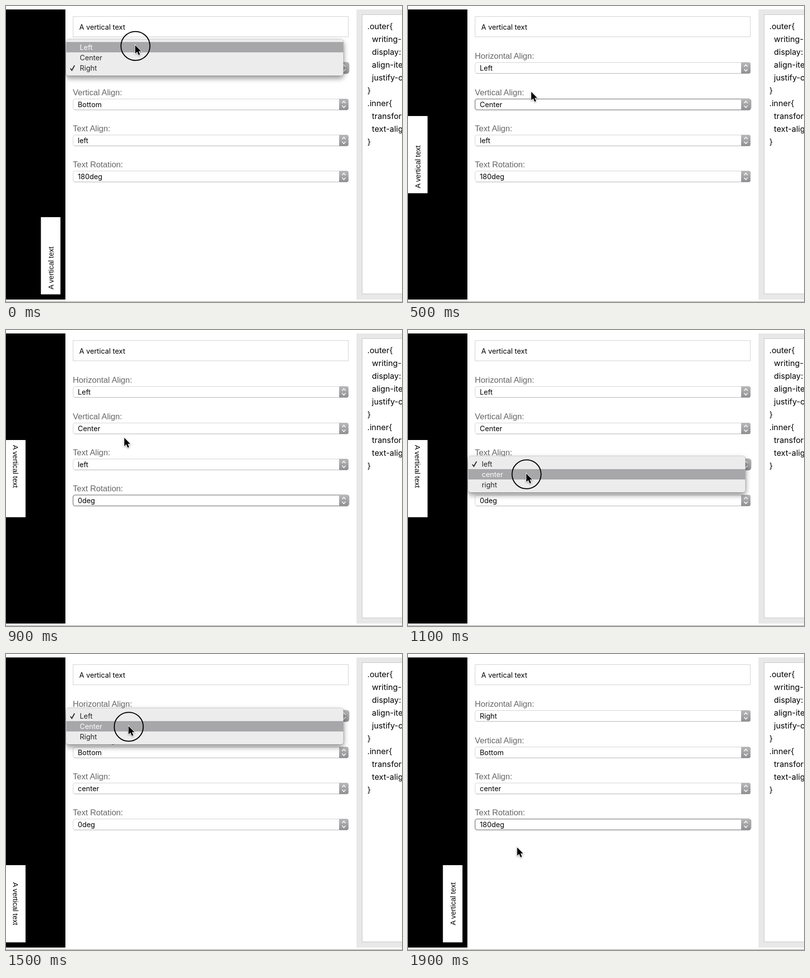
An HTML page that plays this animation: 800x600 px, repeating every 2000 ms.

```html
<!DOCTYPE html>
<html lang="en">
<head>
<meta charset="utf-8">
<title>Vertical text settings</title>
<style>
  html, body { margin: 0; width: 100%; height: 100%; overflow: hidden; background: #fff; }
  svg { display: block; width: 100vw; height: 100vh; }
  text { font: 14.3px Inter, Roboto, sans-serif; }
  .label { font: 16.6px "Liberation Sans", Arial, sans-serif; fill: #666; }
  .rotated { font: 14.6px "Liberation Sans", Arial, sans-serif; }
  .code { font-size: 16.2px; }
  .menu { filter: drop-shadow(0 5px 6px rgba(0, 0, 0, .36)) drop-shadow(0 0 1px rgba(0, 0, 0, .35)); }
  .cursor { filter: drop-shadow(0 1.5px 1.5px rgba(0, 0, 0, .4)); }
</style>
</head>
<body>
<svg viewBox="0 0 800 600">
  <defs>
    <linearGradient id="button" x2="0" y2="1">
      <stop stop-color="#b9b9bb"/><stop offset="1" stop-color="#8f8f93"/>
    </linearGradient>
  </defs>
  <path d="M0 7H120V595H0Z"/>
  <path d="M708 7H800V595H708Z" fill="#e8e8e8"/>
  <rect x="719.5" y="17.5" width="100" height="566" fill="#fff" stroke="#c6c6c6"/>
  <rect x="135.5" y="21.5" width="556" height="41" fill="#fff" stroke="#d0d0d0"/>
  <path d="M0 599.5H800" stroke="#999"/>
  <text x="148" y="48">A vertical text</text>
  <g id="code"></g>
  <g id="scene"></g>
</svg>
<script>
const STEP = 100, ITEM = 21;
const fields = {
  h: { label: 'Horizontal Align:', y: 125.5, menuY: 125.5, options: ['Left', 'Center', 'Right'] },
  v: { label: 'Vertical Align:', y: 199.5, menuY: 198.5, options: ['Top', 'Center', 'Bottom'] },
  t: { label: 'Text Align:', y: 272.5, menuY: 271.5, options: ['left', 'center', 'right'] },
  r: { label: 'Text Rotation:', y: 345.5, menuY: 344.5, options: ['0deg', '180deg'] }
};

// Each step: pointer x, y, then the focused field, the hovered option of its open menu, and changed values.
const steps = [
  { at: [261, 79.5], focus: 'h', hover: 0, set: { h: 2, v: 2, t: 0, r: 1 } },
  { at: [256, 92], focus: 'h', set: { h: 0 } },
  { at: [242, 158], focus: 'h' },
  { at: [236, 198], focus: 'v', hover: 2 },
  { at: [245, 178], focus: 'v', hover: 1 },
  { at: [249, 174], focus: 'v', set: { v: 1 } },
  { at: [244, 268], focus: 'v' },
  { at: [240, 343.5], focus: 'r', hover: 1 },
  { at: [240, 323], focus: 'r', hover: 0 },
  { at: [239, 218.5], focus: 'r', set: { r: 0 } },
  { at: [238, 271], focus: 't', hover: 0 },
  { at: [239, 291], focus: 't', hover: 1 },
  { at: [236, 198], focus: 'v', hover: 1, set: { t: 1 } },
  { at: [234.5, 213.5], focus: 'v', hover: 2 },
  { at: [246, 125], focus: 'h', hover: 0, set: { v: 2 } },
  { at: [247.5, 146], focus: 'h', hover: 1 },
  { at: [247, 166], focus: 'h', hover: 2 },
  { at: [238, 255], focus: 'h', set: { h: 2 } },
  { at: [224, 365], focus: 'r', hover: 1, set: { r: 1 }, pending: { r: 0 } },
  { at: [220.5, 392], focus: 'r' }
];

const text = (x, y, content, extra = '') => `<text x="${x}" y="${y}" ${extra}>${content}</text>`;

function drawSelect({ label, y, options }, value, focused) {
  const ring = focused
    ? `<rect x="135.5" y="${y - 11}" width="557" height="22" rx="4.5" fill="none" stroke="#a9a9a9" stroke-width="2.2"/>`
    : '';
  return text(135, y - 18.5, label, 'class="label"') +
    `<rect x="135.5" y="${y - 11}" width="556" height="22" rx="4" fill="#fff" stroke="#d2d2d2"/>
     <path d="M138 ${y + 11.2}H690" stroke="#b8b8b8"/>${ring}
     <path d="M673 ${y - 11.5}h15q4 0 4 4v15q0 4 -4 4h-15z" fill="url(#button)"/>
     <path d="M679 ${y - 2.5}l3.5 -4 3.5 4m-7 5l3.5 4 3.5 -4" fill="none" stroke="#fff" stroke-width="1.5"/>` +
    text(145, y + 5, options[value]);
}

function drawMenu({ menuY, options }, value, hover) {
  const top = menuY - value * ITEM - ITEM / 2;
  const items = options.map((option, i) => {
    const y = top + i * ITEM, color = i === hover ? '#fff' : '#262626';
    return (i === hover ? `<rect x="121.5" y="${y}" width="560" height="${ITEM}" fill="#a7a7aa"/>` : '') +
      (i === value ? `<path d="M130 ${y + 11.5}l3 4 5.5 -10" fill="none" stroke="${color}" stroke-width="2"/>` : '') +
      text(149, y + 15.5, option, `fill="${color}"`);
  });
  return `<rect class="menu" x="121.5" y="${top - 5}" width="560" height="${options.length * ITEM + 10}" rx="5" fill="#ececec"/>` +
    items.join('');
}

function drawBox({ h, v, t, r }) {
  const x = [19.75, 55, 90.25][h], y = [96, 301.25, 506.25][v];
  const [textX, anchor] = [[-68.2, 'start'], [0, 'middle'], [68.2, 'end']][t];
  return `<g transform="translate(${x} ${y}) rotate(${r ? -90 : 90})">
    <rect x="-78.25" y="-19.75" width="156.5" height="39.5" fill="#fff"/>` +
    text(textX, 5.4, 'A vertical text', `class="rotated" text-anchor="${anchor}"`) + '</g>';
}

function drawPointer([x, y], pressed) {
  return (pressed ? `<circle cx="${x + .5}" cy="${y + 1.5}" r="29.3" fill="none" stroke="#000" stroke-width="2"/>` : '') +
    `<path class="cursor" transform="translate(${x} ${y})" stroke="#fff" stroke-width="2" paint-order="stroke"
      d="M0 0V16.8L4 13.2 6.9 19.9 9.7 18.7 6.9 12.2H12Z"/>`;
}

function drawScene(index) {
  const { at, focus, hover, pending } = steps[index];
  const values = Object.assign({}, ...steps.slice(0, index + 1).map(step => step.set), pending);
  const open = hover !== undefined;
  return drawBox(values) +
    Object.keys(fields).map(key => drawSelect(fields[key], values[key], key === focus)).join('') +
    (open ? drawMenu(fields[focus], values[focus], hover) : '') +
    drawPointer(at, open);
}

const code = ['.outer{', ' writing-mode: vertical-lr;', ' display: flex;', ' align-items: flex-end;',
  ' justify-content: flex-end;', '}', '.inner{', ' transform: rotate(180deg);', ' text-align: left;', '}'];
document.getElementById('code').innerHTML = code.map((line, i) =>
  text(line[0] === ' ' ? 739.3 : 730, 47 + 26 * i, line.trim(), 'class="code"')).join('');

const scene = document.getElementById('scene');
const start = performance.now();
let shown = -1;
function tick() {
  const index = Math.floor((performance.now() - start) / STEP) % steps.length;
  if (index !== shown) scene.innerHTML = drawScene(shown = index);
  requestAnimationFrame(tick);
}
tick();
</script>
</body>
</html>
```
